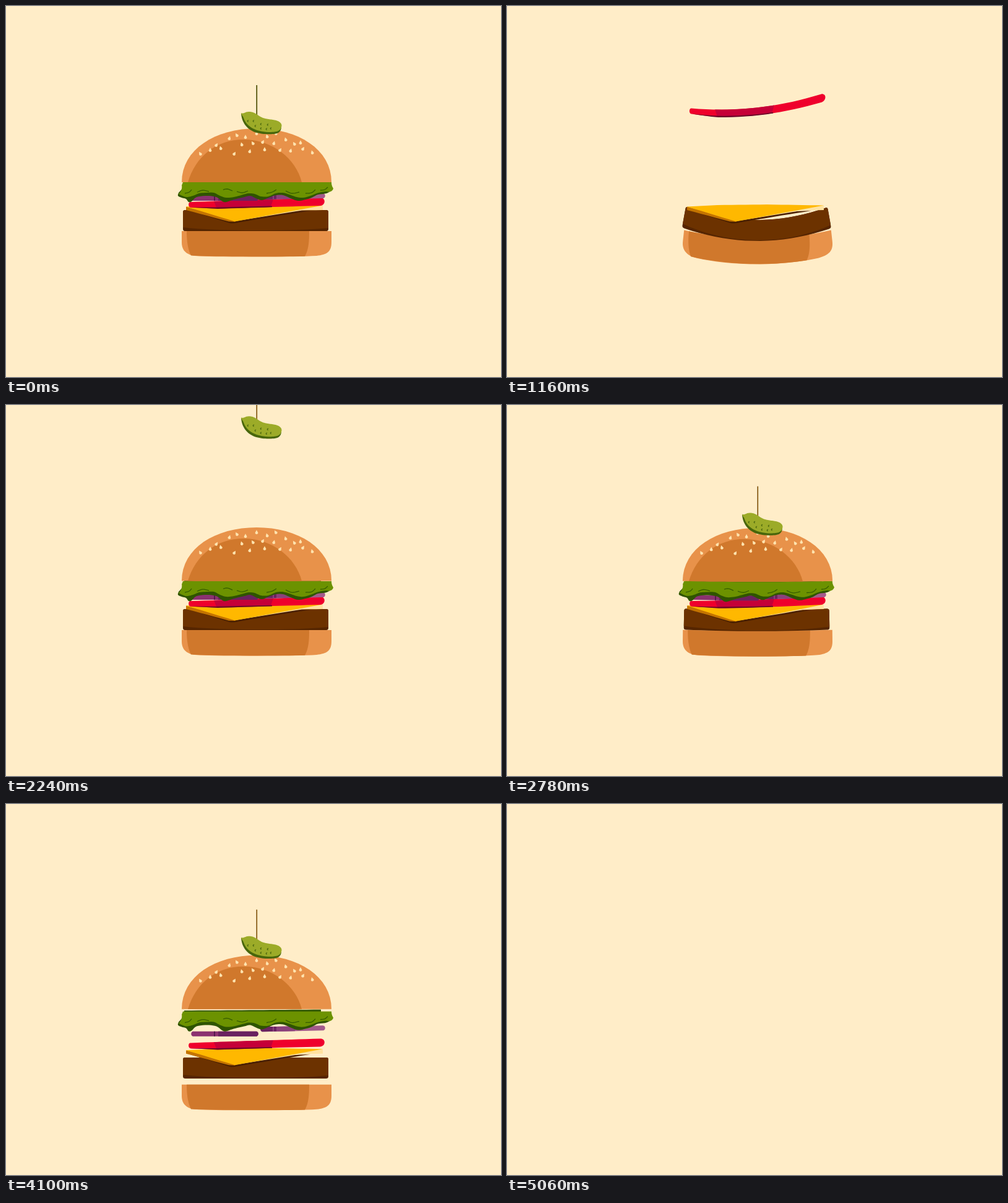
An HTML page with a canvas that plays this animation: 800 by 600 pixels, repeating every 5210 ms.

```html
<!DOCTYPE html>
<html lang="en">
<head>
<meta charset="utf-8">
<title>Burger</title>
<style>
html, body { margin: 0; width: 100%; height: 100%; overflow: hidden; background: #ffedc8; }
canvas { display: block; width: 800px; height: 600px; }
</style>
</head>
<body>
<canvas id="stage" width="800" height="600"></canvas>
<script>
const ctx = document.getElementById('stage').getContext('2d');
const LOOP = 5210, HOLD = 500, STEP = 30, FALL = 300, MID = 405;
const DROP_START = 3820, DROP_TIME = 1656;

// Samples a path into points so it can be bent. R is a smooth run through points.
function trace(d) {
  const out = [];
  const last = () => out[out.length - 1];
  function cubic(a, b, c, e, n = 10) {
    for (let i = 1; i <= n; i++) {
      const t = i / n, s = 1 - t;
      out.push([0, 1].map(k =>
        s * s * s * a[k] + 3 * s * s * t * b[k] + 3 * s * t * t * c[k] + t * t * t * e[k]));
    }
  }
  function line(a, b) {
    const n = Math.max(1, Math.ceil(Math.hypot(b[0] - a[0], b[1] - a[1]) / 12));
    for (let i = 1; i <= n; i++) {
      out.push([a[0] + (b[0] - a[0]) * i / n, a[1] + (b[1] - a[1]) * i / n]);
    }
  }
  for (const [, cmd, body] of d.matchAll(/([MLCR])([^MLCRZ]*)/g)) {
    const v = (body.match(/-?[\d.]+/g) || []).map(Number), p = [];
    for (let i = 0; i < v.length; i += 2) p.push([v[i], v[i + 1]]);
    if (cmd === 'M') out.push(p[0]);
    if (cmd === 'L') p.forEach(q => line(last(), q));
    if (cmd === 'C') for (let i = 0; i < p.length; i += 3) cubic(last(), p[i], p[i + 1], p[i + 2], 16);
    if (cmd === 'R') {
      const q = [last(), ...p];
      const at = i => q[Math.max(0, Math.min(q.length - 1, i))];
      for (let i = 0; i < q.length - 1; i++) {
        const lead = (a, b, s) => [0, 1].map(k => at(s)[k] + (b[k] - a[k]) / 6);
        cubic(q[i], lead(at(i - 1), at(i + 1), i), lead(at(i + 2), at(i), i + 1), q[i + 1], 5);
      }
    }
  }
  if (/Z/.test(d)) line(last(), out[0]);
  return out;
}

const fill = (color, d) => ({ color, pts: trace(d) });
const stroke = (color, width, d) => ({ color, width, pts: trace(d) });

function seed(x, y, i) {
  const a = ((i * 7) % 5 - 2) * 0.28, c = 1.15 * Math.cos(a), s = 1.15 * Math.sin(a);
  const at = (u, v) => `${x + u * c - v * s} ${y + u * s + v * c} `;
  return fill('#ffe3ae', 'M' + at(0, -3.4) + 'C' + at(1, -1) + at(2.3, 0) + at(2, 1.2) +
    'C' + at(1.4, 3) + at(-1.4, 3) + at(-2, 1.2) + 'C' + at(-2.3, 0) + at(-1, -1) + at(0, -3.4) + 'Z');
}

const seeds = [[314, 239], [330, 233], [340, 225], [347, 230], [361, 214], [373, 209], [387, 212],
  [369, 239], [381, 224], [394, 235], [399, 222], [405, 206], [415, 220], [422, 211], [433, 222],
  [436, 206], [418, 232], [443, 233], [452, 216], [460, 234], [466, 223], [476, 221], [480, 231], [495, 237]];

const dots = [[391, 186], [400, 186], [403, 194], [412, 191], [412, 198], [421, 199], [423, 192], [428, 198]];

const LIGHT = '#e8924a', CRUST = '#d0782c';

// land: landing time, from: fall height, drop: exit distance, flex: bend in flight,
// hit: force on the stack, give: bend under later hits, hold: where the bend is neutral
const layers = [
  { land: 760, from: 425, drop: 1180, flex: 10, hit: 12, give: 1.08, hold: .92, pivot: 384, parts: [
    fill(LIGHT, 'M284 364 L526 364 L526 382 C526 398 518 402 502 404 C470 406 345 406 312 404.5 C292 404 284 396 284 382 Z'),
    fill(CRUST, 'M292 364 L490 364 C490 381 489 394 483 404.8 C450 405.5 345 405.5 299 403.6 C294 394 292 380 292 364 Z')
  ] },
  { land: 910, from: 385, drop: 1050, flex: 12, hit: 16, give: 2, hold: .71, pivot: 347, parts: [
    fill('#552500', 'M290 330 L517 330 C520 330 521 331 521 334 L521 360 C521 363 520 364 517 364 L290 364 C287 364 286 363 286 360 L286 334 C286 331 287 330 290 330 Z'),
    fill('#6c3200', 'M290 330 L517 330 C520 330 521 331 521 334 L521 359 C470 364.5 340 364.5 286 358 L286 334 C286 331 287 330 290 330 Z')
  ] },
  { land: 1070, from: 355, drop: 969, flex: 8, hit: 21, give: 1.4, hold: .75, pivot: 335, parts: [
    fill('#4a2000', 'M291 329 L361 351 C365 352 370 351.5 374 350.5 L445 338.5 L492 331 L400 335 Z'),
    fill('#ffe2a0', 'M512 322.5 L512 330 L478 330.5 L370 348 L370 346 Z'),
    fill('#c47400', 'M291 324.5 L291 330 L360 348.6 L370 349 L372 346 Z'),
    fill('#ffb800', 'M291 324.5 L340 322 L420 321 L512 322.5 L370 348.5 Z')
  ] },
  { land: 1234, from: 345, drop: 912, flex: 18, tilt: 12.6, hit: 32, give: 1.4, hold: .75, pivot: 319, parts: [
    fill('#ef002c', 'M298 317 C294 317 294 326 299 326 L340 327 L430 325 L508 323 C517 322 517 310 508 310 Z'),
    fill('#c50038', 'M336 315.8 L432 312.5 L428 324.5 L340 326 Z'),
    fill('#6b0029', 'M299 325.6 L342 328 L430 325.3 L430 323.6 L340 325.6 Z')
  ] },
  { land: 1400, from: 335, drop: 798, flex: 8, hit: 12, give: 1.4, hold: .75, pivot: 311, parts: [
    fill('#8b3270', 'M303 307 L404 307 C409 307 409 315 404 315 L303 315 C298 315 298 307 303 307 Z'),
    fill('#6a2260', 'M343 307 L404 307 C409 307 409 315 404 315 L343 315 Z'),
    fill('#54194d', 'M336 307 L338 307 L338 315 L336 315 Z')
  ] },
  { land: 1470, from: 335, drop: 727, flex: 8, hit: 14, give: 1.4, hold: .75, pivot: 308, parts: [
    fill('#a35b8c', 'M415 305 L512 303 C517 303 517 311 512 311 L415 313 C410 313 410 305 415 305 Z'),
    fill('#8b417b', 'M437 304.6 L469 304 L467 312 L437 312.5 Z'),
    fill('#6a2460', 'M415 305 L437 304.6 L437 312.5 L415 313 C410 313 410 305 415 305 Z'),
    fill('#8b417b', 'M431 304.7 L433 304.7 L433 312.6 L431 312.6 Z')
  ] },
  { land: 1660, from: 330, drop: 664, flex: 14, hit: 22, give: 1.3, hold: .8, pivot: 298, parts: [
    fill('#2f5400', 'M288 283.5 L509 282 L509 288 L288 288 Z'),
    fill('#2f5400', 'M279 302 R278 307 284 310 291 312 295 317 300 316 308 309 325 307 340 309 350 316 356 317 368 313 385 309 395 307 406 312 414 314 424 310 436 306 448 306 460 311 472 315 484 313 494 310 504 305 518 303 528 297 L526 290 L290 290 Z'),
    fill('#6c9200', 'M286 285 L526 285 C526 289 527 292 529 295 C528 299 524 302 518 300 R510 301 502 303 492 307 480 310 470 309 458 305 447 302 436 303 424 308 412 308 402 304 392 303 380 306 368 309 356 310 346 307 336 302 324 302 312 303 302 307 292 309 285 307 279 304 C283 301 285 294 284 290 Z'),
    ...['M309 301 R318 298 328 300', 'M351 297 R358 296 366 299', 'M373 300 R382 302 391 299',
      'M421 303 R430 301 437 297', 'M452 299 R462 303 474 301', 'M484 303 R494 302 500 297',
      'M508 298 R515 297 520 293', 'M289 303 R296 301 300 297'].map(d => stroke('#365d00', 1.3, d))
  ] },
  { land: 1879, from: 320, drop: 614, flex: 20, hit: 28, give: .8, hold: .8, pivot: 268, parts: [
    fill(LIGHT, 'M284 285 C284 232 338 198 405 198 C472 198 526 232 526 285 Z'),
    fill(CRUST, 'M294 285 C306 244 339 216 384 216 C430 216 468 246 478 285 Z'),
    ...seeds.map(([x, y], i) => seed(x, y, i))
  ] },
  { land: 2370, from: 225, drop: 562, flex: 0, hit: 16, give: 0, hold: 1, pivot: 190, hop: true, parts: [
    stroke('#fff8e2', 1, 'M403.7 128 L403.7 178'),
    { ...stroke('#8d621c', 1.9, 'M405.2 128 L405.2 180'), stick: true },
    fill('#48660b', 'M380 174 C381 188 389 199 402 204 C414 208 430 208 438 206 C443 204 445 200 445 195 L420 190 L385 176 Z'),
    fill('#9cab28', 'M380 173 C384 175 386 171 393 171 C401 171 406 176 412 179.5 C419 183 427 183 434 184.5 C443 186 447 191 445 196 C443 203 436 204 424 204 C404 203 389 196 384 181 C383 178 381 177 380 173 Z'),
    ...dots.map(([x, y]) => stroke('#4f6a10', 1.3, `M${x + 1} ${y - 1.6} R${x - .7} ${y} ${x + .6} ${y + 1.6}`))
  ] }
];

const HOP = { time: 335, height: 23, sink: 5.5 };

function wobble(age) {
  if (age <= 0) return 0;
  const w = Math.sin(age / 360 * 2 * Math.PI) * Math.exp(-age / 180);
  return w < 0 ? w * 0.4 : w;
}

const smooth = u => { u = Math.max(0, Math.min(1, u)); return u * u * (3 - 2 * u); };

function pose(layer, i, t) {
  if (t < HOLD) return { y: 0, bend: 0, flex: 0, tilt: 0 };
  const age = t - layer.land;
  const p = Math.max(0, 1 + age / FALL);
  const settle = age < 0 ? p : Math.exp(-age / 100) * Math.cos(age / 360 * 2 * Math.PI);
  let y = age < 0 ? -layer.from * (1 - p * p) : 0;
  if (layer.hop && age > 0) {
    const h = age / HOP.time;
    y = h < 1 ? -HOP.height * 4 * h * (1 - h) : HOP.sink * wobble(age - HOP.time);
  }
  y += layer.drop * smooth((t - DROP_START) / DROP_TIME);
  let sag = 0;
  if (age >= 0) {
    // The two lowest layers also give way under their own landing.
    for (const other of layers.slice(i < 2 ? i : i + 1)) sag += other.hit * wobble(t - other.land);
  }
  return { y, bend: sag * layer.give, flex: layer.flex * settle, tilt: (layer.tilt || 0) * settle };
}

function drawLayer(layer, i, t) {
  const { y, bend, flex, tilt } = pose(layer, i, t);
  const turn = (bend + flex) / 120;
  for (const part of layer.parts) {
    ctx.beginPath();
    for (const [px, py] of part.pts) {
      const u = (px - MID) / 120;
      ctx.lineTo(px + u * (py - layer.pivot) * turn,
        py + y + bend * (layer.hold - u * u) - flex * u * u - tilt * u);
    }
    if (part.width) {
      ctx.lineWidth = part.width;
      ctx.strokeStyle = part.stick && t < HOLD ? '#59590f' : part.color;
      ctx.stroke();
    } else {
      ctx.fillStyle = part.color;
      ctx.fill();
    }
  }
}

function draw(t) {
  ctx.fillStyle = '#ffedc8';
  ctx.fillRect(0, 0, 800, 600);
  layers.forEach((layer, i) => drawLayer(layer, i, t));
}

const begin = performance.now();
function tick(now) {
  const t = Math.max(0, now - begin) % LOOP;
  draw(t < HOLD ? 0 : HOLD + Math.floor((t - HOLD) / STEP) * STEP);
  requestAnimationFrame(tick);
}
draw(0);
requestAnimationFrame(tick);
</script>
</body>
</html>
```
